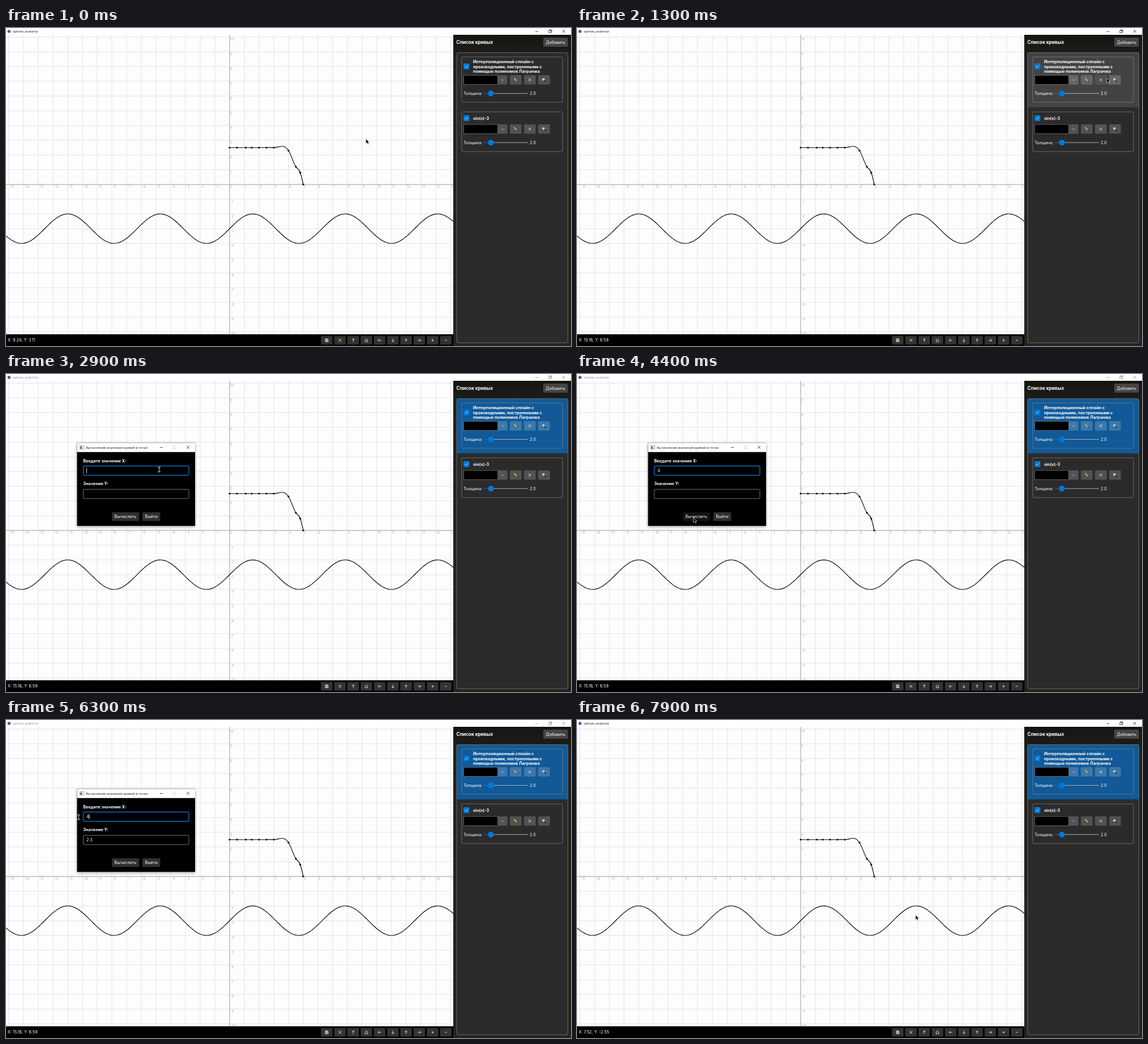
An HTML page for the animation above (8000 ms loop, 998x561 px).

```html
<!DOCTYPE html>
<html lang="ru">
<head>
<meta charset="utf-8">
<title>splines_avalonia</title>
<style>
html, body { margin: 0; width: 100%; height: 100%; overflow: hidden; background: #000; }
svg { display: block; width: 998px; height: 561px; }
text { font-family: Inter, "Open Sans", sans-serif; font-size: 7.28px; fill: #fff; white-space: pre; }
.b { font-weight: 700; }
.cap { font-family: "Open Sans", "Noto Sans", sans-serif; font-size: 5.85px; fill: #111; }
.tick { font-size: 6px; fill: #b4b4b4; }
.line { fill: none; stroke: #fff; stroke-width: .8; }
.btn { fill: #fff; fill-opacity: .19; }
.btn.hot { fill-opacity: .08; }
.frame { fill: none; stroke: #848484; stroke-width: .7; }
.field { fill: #000; stroke: #8c8c8c; stroke-width: .8; }
.field.on { stroke: #0a80dc; stroke-width: 1.2; }
#main.off { opacity: .5; }
</style>
</head>
<body>
<svg id="stage" viewBox="0 0 998 561" xmlns="http://www.w3.org/2000/svg"></svg>
<script>
const OX = 395, OY = 276, UNIT = 26, LOOP = 8000;
const BLUE = '#0078d7';
const px = x => OX + x * UNIT, py = y => OY - y * UNIT;
const range = (a, b) => Array.from({ length: b - a + 1 }, (_, i) => a + i);

const rect = (x, y, w, h, attrs = '') => `<rect x="${x}" y="${y}" width="${w}" height="${h}" ${attrs}/>`;
const text = (x, y, s, cls = '', attrs = '') => `<text x="${x}" y="${y}" class="${cls}" ${attrs}>${s}</text>`;
const mid = (x, y, s, cls = '') => text(x, y, s, cls, 'text-anchor="middle"');
const path = (d, attrs = 'class="line"') => `<path d="${d}" ${attrs}/>`;
const cross = (x, y, r) => `M${x - r} ${y - r}l${2 * r} ${2 * r}m0 ${-2 * r}l${-2 * r} ${2 * r}`;

// Plot

const nodes = [[0, 2.5], [.5, 2.5], [1.1, 2.5], [1.5, 2.5], [2, 2.5], [2.5, 2.5],
  [3, 2.5], [4, 2.3], [4.5, 1.2], [4.8, .8], [5, 0]];

// Slope at node i of the parabola through three neighbouring nodes
function slope(i) {
  const j = Math.min(Math.max(i, 1), nodes.length - 2);
  const [[x0, y0], [x1, y1], [x2, y2]] = nodes.slice(j - 1, j + 2);
  const d1 = (y1 - y0) / (x1 - x0), d2 = (y2 - y1) / (x2 - x1);
  const curve = (d2 - d1) / (x2 - x0);
  return d1 + curve * (2 * nodes[i][0] - x0 - x1);
}

function splinePath() {
  let d = `M${px(nodes[0][0])} ${py(nodes[0][1])}`;
  for (let i = 1; i < nodes.length; i++) {
    const [x0, y0] = nodes[i - 1], [x1, y1] = nodes[i], h = (x1 - x0) / 3;
    d += `C${px(x0 + h)} ${py(y0 + slope(i - 1) * h)} ${px(x1 - h)} ${py(y1 - slope(i) * h)} ${px(x1)} ${py(y1)}`;
  }
  return d;
}

function plot() {
  const sine = range(0, 396).map(i => `${i * 2} ${py(Math.sin((i * 2 - OX) / UNIT) - 3).toFixed(2)}`);
  const grid = range(-15, 15).map(i => `M${px(i)} 12V541`).join('') +
    range(-10, 10).map(i => `M0 ${py(i)}H791`).join('');
  const black = 'fill="none" stroke="#000" stroke-width="1.15"';
  return `<g clip-path="url(#view)">` + rect(0, 12, 791, 529, 'fill="#fdfdfe"') +
    path(grid, 'stroke="#dcd9ea" stroke-width=".8"') +
    path(`M${OX} 12V541M0 ${OY}H791`, 'stroke="#a6a6a6" stroke-width="1"') +
    range(-15, 15).map(i => text(px(i) + 1, 282.3, i, 'tick')).join('') +
    range(-10, 10).filter(Boolean).map(i => text(OX + 1, py(i) + 6.4, i, 'tick')).join('') +
    path('M' + sine.join('L'), black) + path(splinePath(), black) +
    nodes.map(([x, y]) => `<circle cx="${px(x)}" cy="${py(y)}" r="1.6"/>`).join('') + '</g>';
}

// Window parts

function titleBar() {
  return rect(0, 0, 998, 12, 'fill="#fff"') + '<circle cx="5.3" cy="6" r="2.7" fill="#7b3fa0"/><g id="main">' +
    text(12, 8.2, 'splines_avalonia', 'cap') +
    path('M935 6.3h5M958.8 4.5h4v4h-4zM960 4.5v-1.3h4v4h-1.2' + cross(985, 5.8, 2.4),
      'fill="none" stroke="#222" stroke-width=".8"') + '</g>';
}

const icons = [
  x => path(`M${x - 2.5} 548.5h4.2l.8.8v4.2h-5zM${x - 1.3} 548.5v1.6h2.4v-1.6M${x - 1.5} 553.5v-2h3v2`),
  x => path(`M${x - 2.4} 553.4l5-5`, 'stroke="#e8a23c" stroke-width="1.2"') + path(`M${x - 2.6} 548.4l5 5`),
  x => mid(x, 553.6, '?', 'b'),
  x => path(`M${x - 2.8} 551l2.8-2.6 2.8 2.6M${x - 2} 550.5v3.1h4v-3.1`),
  x => path(`M${x + 2.8} 551h-5.4m2.2-2.2l-2.2 2.2 2.2 2.2`),
  x => path(`M${x} 548.2v5.4m-2.2-2.2l2.2 2.2 2.2-2.2`),
  x => path(`M${x} 553.8v-5.4m-2.2 2.2l2.2-2.2 2.2 2.2`),
  x => path(`M${x - 2.8} 551h5.4m-2.2-2.2l2.2 2.2-2.2 2.2`),
  x => path(`M${x - 2} 551h4m-2-2v4`),
  x => path(`M${x - 2} 551h4`)
];

function bottomBar() {
  return rect(0, 540.6, 790.2, 21) + text(3, 553.2, '', '', 'id="readout"') +
    icons.map((icon, i) => {
      const x = 566.5 + i * 23.37;
      return rect(x - 10.2, 543.4, 20.4, 15.2, 'rx="1.5" fill="#333"') + icon(x);
    }).join('');
}

function card(top, bottom, title, row) {
  const y = row + 8.3, slider = row + 32.2;
  const check = top === 51 ? 67.8 : 159;
  return rect(805, top, 178, bottom - top, 'rx="2" class="frame"') +
    rect(808, check - 5.2, 10.4, 10.4, `rx="1.5" fill="${BLUE}"`) + path(`M810.7 ${check}l1.9 2 3.4-3.8`) +
    title.map((s, i) => text(825, check + 2.7 + (i - (title.length - 1) / 2) * 8.7, s, 'b')).join('') +
    rect(808.3, row, 77.4, 16.6, 'rx="1.5" class="btn"') +
    rect(808.6, row + .3, 60, 16, 'stroke="#fff" stroke-opacity=".42" stroke-width=".6"') +
    path(`M874 ${y - 1.4}l3.1 3 3.1-3`, 'fill="none" stroke="#bbb" stroke-width=".8"') +
    [890, 915, 940].map(x => rect(x, row, 20.6, 16.6, 'rx="1.5" class="btn"')).join('') +
    path(`M897.4 ${y - 3}l5 5.2`, 'stroke="#f0b43c" stroke-width="1.7"') +
    path(`M902.4 ${y + 2.2}l1.3 1.4`, 'stroke="#222" stroke-width="1.1"') +
    path(cross(925.2, y, 2.4)) +
    path(`M951 ${y + 1}l2.6 2.6`, 'stroke="#1c1c1c" stroke-width="1.4"') +
    `<circle cx="949.3" cy="${y - .9}" r="2.4" fill="#a9d3ee" stroke="#6b7780" stroke-width=".8"/>` +
    text(808, slider + 2.6, 'Толщина:') +
    path(`M844 ${slider}H857`, `stroke="${BLUE}" stroke-width="1"`) +
    path(`M857 ${slider}H922`, 'stroke="#b0b0b0" stroke-width="1"') +
    `<circle cx="856.5" cy="${slider}" r="5.2" fill="${BLUE}"/>` + text(925, slider + 2.6, '2.0');
}

function sidePanel() {
  return rect(790.2, 12, 207.8, 549, 'fill="url(#dark)"') +
    text(795.5, 28, 'Список кривых', 'b', 'style="font-size:8.32px"') +
    rect(949, 17, 43.5, 16, 'rx="1.5" fill="#454547"') + mid(970.8, 27.6, 'Добавить') +
    rect(796, 43.5, 196.5, 512, 'rx="2.5" fill="#2b2b2b"') +
    rect(796, 43.5, 196.5, 96.5, 'rx="2" id="item"') +
    rect(796, 43.5, 196.5, 512, 'rx="2.5" class="frame"') +
    card(51, 131, ['Интерполяционный сплайн с', 'производными, построенными с', 'помощью полиномов Лагранжа'], 83.2) +
    card(148, 218, ['sin(x)-3'], 169.9);
}

function dialog() {
  return '<g id="dialog"><g filter="url(#shadow)">' + rect(125.5, 121.7, 208.5, 146.2) + '</g>' +
    rect(125.5, 121.7, 208.5, 16, 'fill="#fff"') +
    rect(130.3, 126.2, 7.4, 6.4, 'fill="#f3f3f3" stroke="#777" stroke-width=".6"') +
    rect(131.2, 127.8, 3, 4, 'fill="#2f7fb5"') +
    text(141, 131.9, 'Вычисление значения кривой в точке', 'cap') +
    path('M271.8 129.6h5.2' + cross(321.6, 129.3, 2.6), 'fill="none" stroke="#222" stroke-width=".8"') +
    rect(295.5, 127, 4.6, 4.6, 'fill="none" stroke="#ccc" stroke-width=".7"') +
    text(136.3, 155.6, 'Введите значение X:', 'b') + text(136.3, 196.4, 'Значение Y:', 'b') +
    rect(136.5, 162.4, 186.5, 16.2, 'rx="1.8" class="field" id="inX"') +
    rect(136.5, 203.4, 186.5, 16.4, 'rx="1.8" class="field"') +
    text(142, 173.2, '', '', 'id="valX"') + text(142, 214.2, '', '', 'id="valY"') +
    rect(142, 166, .8, 9, 'fill="#fff" id="caret"') +
    rect(187, 244, 48.2, 15.2, 'rx="1.5" class="btn"') + mid(210.8, 254.2, 'Вычислить') +
    rect(241, 244, 31.4, 15.2, 'rx="1.5" class="btn"') + mid(256.6, 254.2, 'Выйти') + '</g>';
}

const stage = document.getElementById('stage');
stage.innerHTML = `<defs><clipPath id="view">${rect(0, 12, 790.2, 528.6)}</clipPath>
  <linearGradient id="dark" x2="0" y2="1"><stop stop-color="#141411"/><stop offset=".08" stop-color="#20201d"/>
  <stop offset="1" stop-color="#232320"/></linearGradient>
  <filter id="shadow" x="-10%" y="-10%" width="120%" height="125%">
  <feDropShadow dx="0" dy="1.5" stdDeviation="2.5" flood-opacity=".4"/></filter></defs>` +
  plot() + titleBar() + bottomBar() + sidePanel() + dialog() +
  path('M0 0V8.4L2 6.6 3.5 9.8 5 9.1 3.6 6H6.2Z', 'id="arrow" fill="#000" stroke="#fff" stroke-width=".6"') +
  '<g id="beam" fill="none">' + [['#111', 2], ['#c8c8c8', 1]].map(([color, w]) =>
    path('M-2.4-4.2H2.4M0-4.2V4.2M-2.4 4.2H2.4', `stroke="${color}" stroke-width="${w}"`)).join('') + '</g>';

// Motion: pointer stops as time, x, y; a repeated place is a rest

const EXIT = 650, SELECT = 1600, OPEN = 1800, FOCUS = 2800, TYPE = 3700, CALC = 4500, REFOCUS = 5900, CLOSE = 7200;
const track = [
  [0, 635.24, 195.14], [EXIT, 789.16, 104.66], [1000, 925, 87], [1300, 935, 88], [1500, 948, 91],
  [2000, 948, 91], [2700, 270, 168], [3800, 270, 168], [4400, 205, 253], [5300, 205, 253],
  [5800, 152, 171], [6000, 152, 171], [6300, 128, 171], [6500, 128, 171], [7000, 256, 253],
  [7200, 256, 253], [7870, 590.52, 342.3], [7900, 597.5, 343.6]
];

function speed(i, axis) {
  const prev = track[i - 1], at = track[i], next = track[i + 1];
  if (!prev || !next || prev[axis] === at[axis] || next[axis] === at[axis]) return 0;
  return (next[axis] - prev[axis]) / (next[0] - prev[0]);
}

function pointer(t) {
  const i = track.findIndex(k => k[0] >= t);
  if (i <= 0) return track[i < 0 ? track.length - 1 : 0].slice(1);
  const a = track[i - 1], b = track[i], h = b[0] - a[0], p = (t - a[0]) / h, q = 1 - p;
  return [1, 2].map(n => a[n] * q * q * (1 + 2 * p) + b[n] * p * p * (1 + 2 * q) +
    h * p * q * (speed(i - 1, n) * q - speed(i, n) * p));
}

const $ = id => document.getElementById(id);
const show = (el, on) => el.style.display = on ? '' : 'none';
const buttons = [...document.querySelectorAll('.btn')].map(el => ({ el, modal: !!el.closest('#dialog'),
  box: ['x', 'y', 'width', 'height'].map(a => +el.getAttribute(a)) }));
const inside = ([bx, by, w, h], x, y) => x >= bx && x <= bx + w && y >= by && y <= by + h;

function draw(t) {
  const [x, y] = pointer(t);
  const active = t >= OPEN && t < CLOSE;
  const focus = t >= FOCUS && t < CALC ? FOCUS : t >= REFOCUS && t < 7000 ? REFOCUS : 0;

  const [rx, ry] = pointer(t <= CLOSE ? Math.min(t - 30, EXIT) : t - 30);
  $('readout').textContent = `X: ${((rx - OX) / UNIT).toFixed(2)}, Y: ${((OY - ry) / UNIT).toFixed(2)}`;

  const over = inside([796, 43.5, 196.5, 96.5], x, y);
  $('item').setAttribute('fill', t >= SELECT ? '#115997' : over ? '#434343' : 'none');
  $('main').setAttribute('class', active ? 'off' : '');
  for (const b of buttons) b.el.classList.toggle('hot', b.modal === active && inside(b.box, x, y));

  const fade = t === OPEN || t === CLOSE;
  show($('dialog'), active || fade);
  $('dialog').setAttribute('opacity', fade ? .6 : 1);
  $('dialog').setAttribute('transform', fade ? 'translate(229.6 194.6) scale(.98) translate(-229.6 -194.6)' : '');
  $('inX').classList.toggle('on', focus > 0);
  $('valX').textContent = t >= TYPE ? '4' : '';
  $('valY').textContent = t >= CALC ? '2.3' : '';
  $('caret').setAttribute('x', t >= TYPE ? 146.6 : 142);
  const blink = t >= TYPE && t < CALC ? TYPE : focus;
  show($('caret'), focus && (t - blink) % 1000 < 500);

  const field = [[136.5, 162.4, 186.5, 16.2], [136.5, 203.4, 186.5, 16.4]].some(box => inside(box, x, y));
  const beam = active && (field || t >= REFOCUS && t <= 6500);
  show($('beam'), beam);
  show($('arrow'), !beam);
  $(beam ? 'beam' : 'arrow').setAttribute('transform', `translate(${x + .5} ${y + .5})`);
}

function tick() {
  draw(Math.floor(performance.now() % LOOP / 100) * 100);
  requestAnimationFrame(tick);
}
tick();
</script>
</body>
</html>
```
